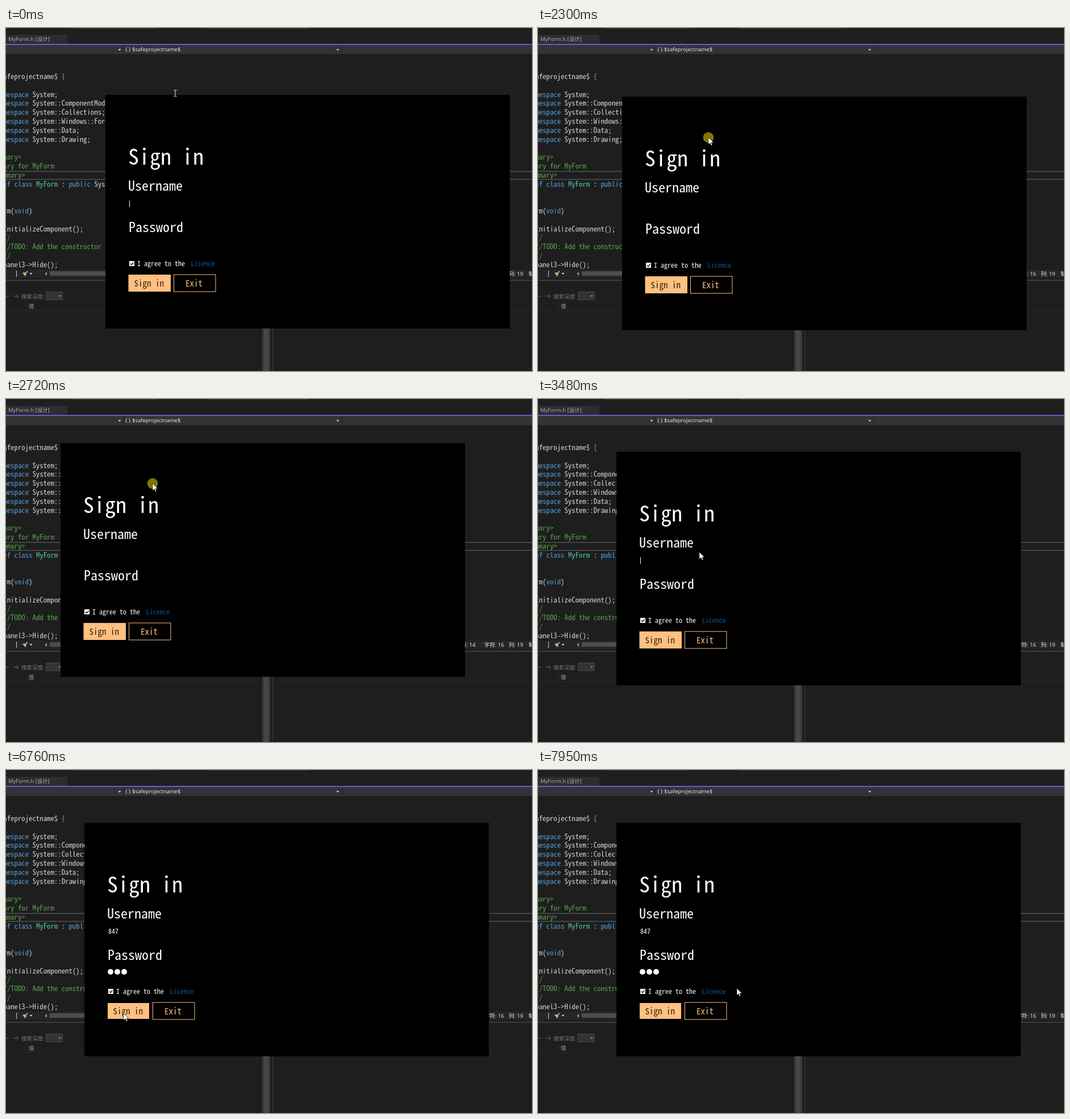
Write an HTML page that moves like this. It is 926 by 605 pixels and loops after 8000 ms.

```html
<!DOCTYPE html>
<html lang="en">
<head>
<meta charset="utf-8">
<title>Sign in form</title>
<style>
  html, body { margin: 0; width: 100%; height: 100%; overflow: hidden; background: #1e1e1e; }
  svg { display: block; width: 926px; height: 605px; }
  text { white-space: pre; }
  .mono { font-family: "Noto Sans Mono CJK SC", "Noto Sans Mono CJK JP", "Liberation Mono", monospace; }
  .ui { font-family: "Open Sans", "Noto Sans CJK SC", sans-serif; font-size: 9.5px; }
  .code { font-size: 12.8px; fill: #d4d4d4; }
  .b { fill: #569cd6; }
  .g { fill: #57a64a; }
  .t { fill: #4ec9b0; }
  .o { fill: #b09a7c; }
</style>
</head>
<body>
<svg viewBox="0 0 926 605" xmlns="http://www.w3.org/2000/svg">
  <rect width="926" height="605" fill="#1e1e1e"/>

  <!-- tabs and navigation bar -->
  <rect width="926" height="28" fill="#1f1f20"/>
  <path d="M119 .5H267M354 .5H533" stroke="#424245"/>
  <rect y="12" width="108" height="16" fill="#2d2d30"/>
  <text class="ui" x="4" y="23" fill="#b4b4b4">MyForm.h [设计]</text>
  <rect y="28" width="926" height="2" fill="#6a5acd"/>
  <rect y="30" width="926" height="16" fill="#333337"/>
  <path d="M206.5 30V46M591.5 30V46" stroke="#232326"/>
  <path d="M197.5 37h5l-2.5 3zM581.5 37h5l-2.5 3z" fill="#d8d8d8"/>
  <text class="ui" x="210" y="41" fill="#f0f0f0">{ }</text>
  <text class="ui" x="222" y="41" fill="#f0f0f0">$safeprojectname$</text>

  <!-- editor -->
  <path d="M0 253H926M0 267H926" stroke="#444446" stroke-width="2"/>
  <g id="code" class="mono code"></g>

  <!-- editor footer -->
  <rect y="426" width="926" height="15" fill="#252527"/>
  <path d="M18.5 428V439" stroke="#d0d0d0"/>
  <path d="M38 429l-4 4" stroke="#d8d8d8" stroke-width="1.5"/>
  <path d="M29 432l4-1 3 3-2 4z" fill="#d9b36c"/>
  <path d="M41.5 432h5l-2.5 3z" fill="#e0e0e0"/>
  <path d="M72 430v7l-3.5-3.5z" fill="#9a9a9a"/>
  <rect x="77" y="429" width="620" height="8" fill="#4d4d4f"/>
  <g class="ui" fill="#f0f0f0">
    <text x="801" y="437">行: 14</text>
    <text x="842" y="437">字符: 16</text>
    <text x="885" y="437">列: 19</text>
    <text x="920" y="437">制</text>
  </g>
  <rect y="444" width="926" height="2" fill="#3d3d40"/>

  <!-- lower pane -->
  <path d="M0 473H5M13 473H22M18.5 469.5L22 473l-3.5 3.5" fill="none" stroke="#68686a"/>
  <text class="ui" x="27" y="476.5" fill="#77777a">搜索深度:</text>
  <rect x="70.5" y="465.5" width="29" height="14" fill="#333336" stroke="#46464a"/>
  <path d="M92 471.5h5l-2.5 3z" fill="#8a8a8a"/>
  <path d="M36.5 484V497M0 498.5H450M470 498.5H926" stroke="#2b2b2d"/>
  <text class="ui" x="40" y="494" fill="#a0a0a0">值</text>
  <rect x="451" y="484" width="14" height="121" fill="#38383a"/>
  <rect x="454" y="484" width="8" height="121" fill="#464649"/>
  <path d="M469.5 446V605" stroke="#3a3a3d"/>

  <!-- sign-in window -->
  <g id="win" class="mono" fill="#fff">
    <rect width="712" height="412" fill="#000"/>
    <text x="40" y="122.8" font-size="38">Sign in</text>
    <text x="40" y="169" font-size="24">Username</text>
    <text x="41" y="242" font-size="24">Password</text>
    <text id="user" x="42" y="196" font-size="12"></text>
    <g id="dots"><circle cx="46" cy="263" r="5"/><circle cx="58" cy="263" r="5"/><circle cx="70" cy="263" r="5"/></g>
    <rect id="caret" width="1" height="12"/>
    <rect x="42" y="293" width="9" height="9"/>
    <path d="M44 297.5l2 2.2 3.5-4.4" fill="none" stroke="#000" stroke-width="1.3"/>
    <text x="56" y="302" font-size="12">I agree to the</text>
    <text x="150.5" y="302" font-size="12" fill="#0c5a9e">Licence</text>
    <rect id="btn" x="40.5" y="317" width="74.5" height="30" fill="#ffc080"/>
    <text x="50.5" y="338" font-size="15" fill="#2a1c0c">Sign in</text>
    <rect x="120.5" y="317" width="73.5" height="30" fill="#000" stroke="#ffc080"/>
    <text x="141" y="338" font-size="15" fill="#ffc080">Exit</text>
  </g>

  <!-- pointer, tip at the origin -->
  <g id="ptr">
    <circle id="press" r="9.3" fill="#807600"/>
    <path id="arrow" d="M0 0V12.5L3 9.8 5 14.3 7 13.4 5 9H9z" fill="#fff" stroke="#000" stroke-width=".6"/>
    <path id="beam" d="M-2.5-5.5H-.7L0-5 .7-5.5H2.5M0-5V5M-2.5 5.5H-.7L0 5 .7 5.5H2.5" fill="none" stroke="#e8e8e8"/>
  </g>
</svg>
<script>
const $ = id => document.getElementById(id);

// row, column, then class:text pieces
const LINES = [
  [0, 0, "b:namespace ", ":$safeprojectname$ ", "o:{"],
  ...["", "::ComponentModel", "::Collections", "::Windows::Forms", "::Data", "::Drawing"]
    .map((s, i) => [2 + i, 4, "b:using namespace ", `:System${s};`]),
  [9, 4, "g:/// <summary>"],
  [10, 4, "g:/// Summary for MyForm"],
  [11, 4, "g:/// </summary>"],
  [12, 4, "b:public ref class ", "t:MyForm", ": : ", "b:public ", ":System::Windows::Forms::Form"],
  [15, 8, ":MyForm(", "b:void", ":)"],
  [17, 12, ":InitializeComponent();"],
  [18, 12, "g://"],
  [19, 12, "g://TODO: Add the constructor code here"],
  [20, 12, "g://"],
  [21, 12, ":panel3->Hide();"]
];
const NS = "http://www.w3.org/2000/svg";
function add(parent, tag, attrs, text = "") {
  const el = parent.appendChild(document.createElementNS(NS, tag));
  for (const k in attrs) el.setAttribute(k, attrs[k]);
  el.textContent = text;
  return el;
}
for (const [row, col, ...parts] of LINES) {
  const line = add($("code"), "text", { x: -81.5 + col * 6.4, y: 90 + row * 15.8 });
  for (const p of parts) {
    const cut = p.indexOf(":");
    add(line, "tspan", { class: p.slice(0, cut) }, p.slice(cut + 1));
  }
}

const LOOP = 8000, STEP = 70;
const STARTS = [0, 670, 1480, 2090, 2930, 3750, 6210, 7050];
// time, x, y
const WIN = [
  [1550, 175, 118], [1690, 130, 115], [1760, 119, 112], [2020, 119, 112],
  [2160, 136, 113], [2300, 148, 121], [2440, 130, 136], [2510, 109, 135],
  [2580, 76, 120], [2650, 70, 96], [2720, 96, 78], [2790, 130, 81], [2860, 138, 93]
];
const PTR = [
  [600, 298, 115], [900, 303, 130], [1200, 320, 172], [1410, 328, 189], [1550, 328, 189],
  [1690, 276, 184], [1760, 272, 183], [2020, 272, 183], [2160, 292, 184], [2300, 300, 193],
  [2440, 268, 207], [2510, 244, 206], [2580, 223, 188], [2650, 226, 163], [2720, 258, 149],
  [2790, 286, 155], [2860, 291, 164], [2930, 291, 164], [3420, 284, 270], [3490, 284, 270],
  [3560, 279, 263], [6140, 279, 263], [6210, 268, 288], [6560, 210, 420], [6700, 207, 429],
  [6770, 207, 429], [7050, 262, 404], [7400, 322, 391], [7820, 352, 386], [7890, 350, 385]
];
// time, state
const CARET = [[0, 1], [190, 0], [720, 1], [1250, 0], [3060, 1], [4350, 0], [4880, 1], [5540, 0], [5610, 1], [6340, 0]];
const TYPED = [[0, ""], [3610, "8"], [3750, "84"], [3870, "847"]];
const DOTS = [[0, 0], [5610, 1], [5680, 2], [5810, 3]];
const HIDDEN = [[0, 0], [3750, 1], [5540, 0], [5610, 1], [6210, 0]];

const at = (table, t) => table.filter(r => r[0] <= t).pop()[1];
function place(path, t) {
  const i = path.findIndex(k => k[0] > t);
  if (i === 0) return path[0].slice(1);
  if (i < 0) return path[path.length - 1].slice(1);
  const [a, b] = [path[i - 1], path[i]];
  const f = (t - a[0]) / (b[0] - a[0]);
  return [1, 2].map(n => Math.round(a[n] + (b[n] - a[n]) * f));
}
const move = (id, p) => $(id).setAttribute("transform", `translate(${p})`);
const show = (el, on) => el.setAttribute("visibility", on ? "visible" : "hidden");

function draw(t) {
  const start = STARTS.filter(s => s <= t).pop();
  const snap = start + Math.floor((t - start) / STEP) * STEP;
  const ptr = place(PTR, snap);
  move("win", place(WIN, snap));
  move("ptr", ptr);
  const seen = !at(HIDDEN, t), beam = ptr[1] < 118 && t < 1480;
  show($("arrow"), seen && !beam);
  show($("beam"), seen && beam);
  show($("press"), t >= 1480 && t < 2930);

  const typed = at(TYPED, t), dots = at(DOTS, t), inPass = t >= 5010;
  $("user").textContent = typed;
  [...$("dots").children].forEach((d, i) => show(d, i < dots));
  show($("caret"), at(CARET, t));
  $("caret").setAttribute("x", inPass ? 41 + dots * 12 : 42 + typed.length * 6);
  $("caret").setAttribute("y", inPass ? 258 : 186);

  const inset = t >= 6690 ? 1 : 0;
  const btn = { x: 40.5 + inset * .5, y: 317 + inset, width: 74.5 - inset * 1.5, height: 30 - inset * 2 };
  for (const k in btn) $("btn").setAttribute(k, btn[k]);
}
function tick() {
  draw(performance.now() % LOOP);
  requestAnimationFrame(tick);
}
tick();
</script>
</body>
</html>
```
